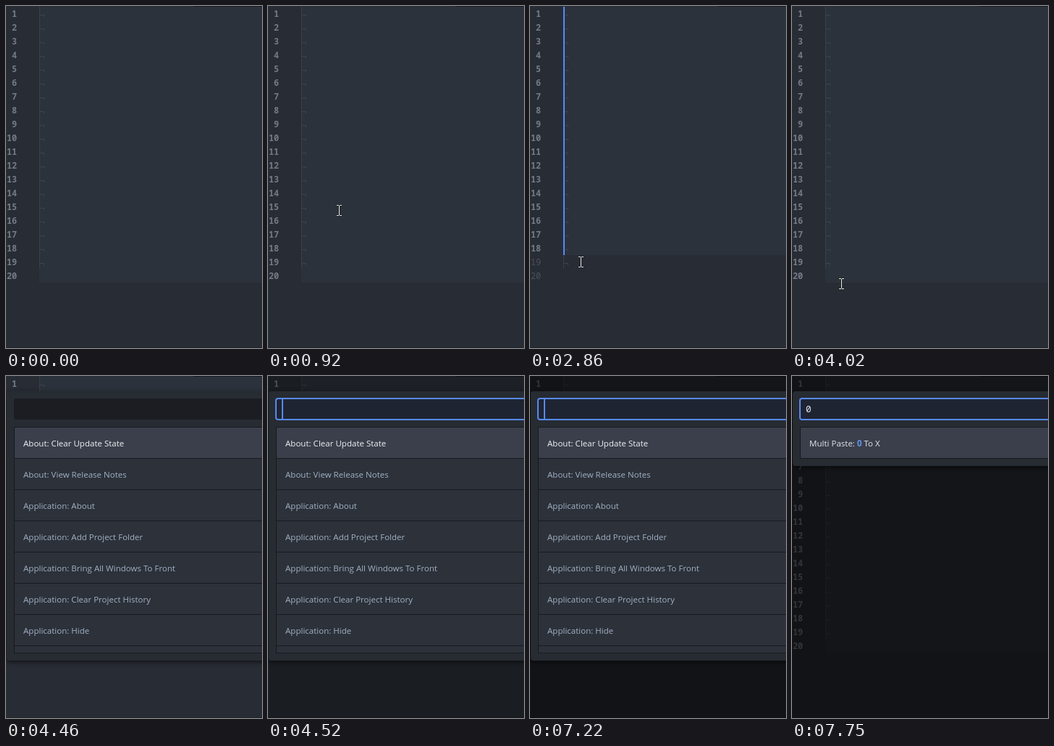
These frames come from a looping animation (354 by 471 pixels, 8000 ms). An HTML page with a canvas:

```html
<!DOCTYPE html>
<html lang="en">
<head>
<meta charset="utf-8">
<title>Multi-cursor editor</title>
<style>
html, body { margin: 0; width: 100%; height: 100%; overflow: hidden; background: #282c34; }
canvas { display: block; }
</style>
</head>
<body>
<canvas id="stage" width="354" height="471"></canvas>
<script>
const W = 354, H = 471, LOOP = 8000;
const ROW = 19, LINES = 20, ITEM = 43, BLINK = 394;
const CLICK = 1560, DRAG = 2210, DRAG_END = 3110, LEAVE = 4020;
const OPEN = 4460, FOCUS = 4520, TYPE = 7500;

const ctx = document.getElementById('stage').getContext('2d');
const MONO = '"Noto Sans Mono", "DejaVu Sans Mono", monospace';
const UI = '11.55px "Open Sans", "Noto Sans", sans-serif';
const BLUE = '#568af2', BRIGHT = '#e2e5ea';

const commands = [
  'About: Clear Update State',
  'About: View Release Notes',
  'Application: About',
  'Application: Add Project Folder',
  'Application: Bring All Windows To Front',
  'Application: Clear Project History',
  'Application: Hide'
];

const progress = (t, from, to) => Math.min(1, Math.max(0, (t - from) / (to - from)));
const easeOut = (k, power) => 1 - (1 - k) ** power;
const lerp = (a, b, k) => a + (b - a) * k;
const bend = (a, mid, b, k) => lerp(lerp(a, mid, k), lerp(mid, b, k), k);
const blinkOn = (t, from) => t < from || Math.floor((t - from) / BLINK) % 2 === 0;

function rect(color, x, y, w, h) {
  ctx.fillStyle = color;
  ctx.fillRect(x, y, w, h);
}

function roundRect(color, x, y, w, h, r) {
  ctx.fillStyle = color;
  ctx.beginPath();
  ctx.roundRect(x, y, w, h, r);
  ctx.fill();
}

// Returns the x where the text ends
function text(str, x, y, color, font, align = 'left') {
  ctx.font = font;
  ctx.fillStyle = color;
  ctx.textAlign = align;
  ctx.fillText(str, x, y);
  return x + ctx.measureText(str).width;
}

function pointerAt(t) {
  if (t < DRAG) {
    const k = progress(t, 710, 1380);
    return [bend(306, -120, 67.5, k), bend(485, 120, 14, k)];
  }
  if (t < LEAVE) {
    const k = progress(t, DRAG, DRAG_END);
    return [67.5 + 4 * Math.sin(Math.PI * k), lerp(14, 382, easeOut(k, 1.95))];
  }
  const k = progress(t, LEAVE, 4400);
  return [lerp(67.5, 306, k), lerp(382, 485, k)];
}

function activeLines(t, pointerY) {
  if (t < CLICK || t >= DRAG_END) return LINES;
  return Math.min(LINES, Math.round((pointerY - 1) / ROW));
}

function cursorsVisible(t) {
  if (t < CLICK || t >= LEAVE) return false;
  return t < DRAG ? blinkOn(t, 1433) : blinkOn(t, 2806);
}

function drawEditor(active, cursors) {
  rect('#282c34', 0, 0, W, H);
  rect('#2c323b', 46, 1, W - 46, active * ROW);
  rect('#181a1f', 259, 0, W - 259, 1);
  rect('#20242a', 0, H - 1, W, 1);
  rect('#3a3f49', 46, 1, 1, (LINES - 1) * ROW);
  for (let i = 0; i < LINES; i++) {
    const y = i * ROW, on = i < active;
    text(i + 1, 15.2, y + 15, on ? '#747a86' : '#4b515d', (on ? 'bold ' : '') + '11.9px ' + MONO, 'right');
    if (i === LINES - 1) break;
    // End-of-line mark
    rect('#3d434d', 47, y + 12, 6, 1);
    rect('#3d434d', 52, y + 13, 1, 2);
  }
  if (cursors) rect('#528bff', 46, 1, 2, active * ROW);
}

function drawPointer(x, y) {
  x = Math.floor(x);
  y = Math.round(y);
  for (const [color, grow] of [['#1d2026', .5], ['#efede4', 0]]) {
    const part = (dx, dy, w, h) =>
      rect(color, x + dx - grow, y + dy - grow, w + 2 * grow, h + 2 * grow);
    part(0, -6, 1, 13);
    for (const dy of [-7, 7]) {
      part(-3, dy, 3, 1);
      part(1, dy, 3, 1);
    }
  }
}

function drawInput(focused, typed, cursor) {
  if (!focused) return roundRect('#1b1d23', 11, 31, W, 29, 3);
  roundRect(BLUE, 10, 30, W, 31, 4);
  roundRect('#1f2433', 12, 32, W, 27, 2);
  if (typed) text('0', 19, 50, BRIGHT, '12.83px ' + MONO);
  if (cursor) rect(BLUE, typed ? 26 : 19, 32, 2, 27);
}

function drawPalette(t) {
  const typed = t >= TYPE, listEnd = typed ? 114 : 382;

  ctx.save();
  ctx.shadowColor = 'rgba(0,0,0,.6)';
  ctx.shadowBlur = 6;
  ctx.shadowOffsetY = 2;
  roundRect('#272b32', 1, 21, W + 20, listEnd - 11, 4);
  ctx.restore();

  drawInput(t >= FOCUS, typed, blinkOn(t, typed ? 7350 : 4850));

  rect('#181a1f', 11, 70, W, listEnd - 70);
  rect('#3a3f4b', 12, 71, W, ITEM - 1);
  if (typed) {
    const x = text('Multi Paste: ', 24, 97, BRIGHT, UI);
    text(' To X', text('0', x, 97, '#6494ed', 'bold ' + UI), 97, BRIGHT, UI);
    return;
  }
  commands.forEach((name, i) => {
    const y = 71 + i * ITEM;
    if (i) rect('#2c313a', 12, y, W, ITEM - 1);
    text(name, 24, y + 26, i ? '#a2b1c3' : '#f0f2f5', UI);
  });
  rect('#2c313a', 12, 71 + commands.length * ITEM, W, 9);
}

function draw(t) {
  const [x, y] = pointerAt(t);
  drawEditor(activeLines(t, y), cursorsVisible(t));
  const dim = .57 * easeOut(progress(t, OPEN, 4690), 3);
  rect(`rgba(0,0,0,${dim})`, 0, 0, W, H);
  if (t >= OPEN) drawPalette(t);
  drawPointer(x, y);
}

const start = performance.now();
function frame() {
  draw((performance.now() - start) % LOOP);
  requestAnimationFrame(frame);
}
frame();
</script>
</body>
</html>
```
